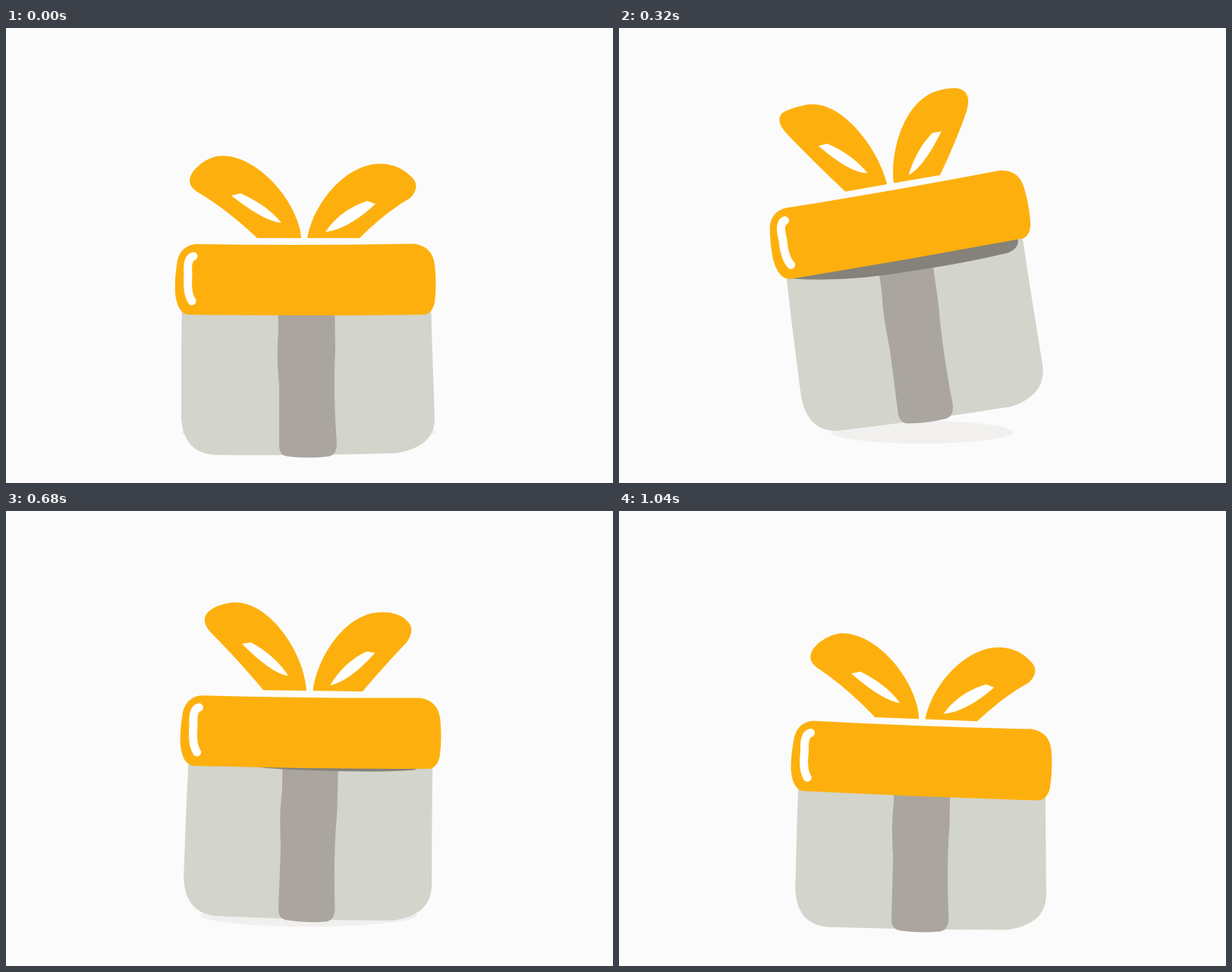
These frames come from a looping animation (800 by 600 pixels, 1.08 s). An HTML page:

```html
<!DOCTYPE html>
<html lang="en">
<head>
<meta charset="utf-8">
<title>Hopping gift box</title>
<style>
  html, body { margin: 0; width: 100%; height: 100%; overflow: hidden; background: #fbfbfb; }
  svg { display: block; width: 100vw; height: 100vh; }
  .gold { fill: #fdb00d; }
  .shine { fill: #fff; }
  .box { fill: #d3d4cb; }
  .ribbon { fill: #aaa69f; }
  .gap { fill: #84827a; }
  .shadow { fill: #f1f0ee; }
  .glint { fill: none; stroke: #fff; stroke-width: 11; stroke-linecap: round; }
</style>
</head>
<body>
<svg viewBox="0 0 800 600">
  <ellipse id="shadow" class="shadow" cx="399" cy="533" rx="168" ry="15"/>
  <g id="body">
    <path class="box" d="M232,355 L231,420 V515 Q234,560 275,563 Q390,564 515,560.5
      Q565,552 565,515 L561,400 L560,355Z"/>
    <path class="ribbon" d="M358,355 L359,400 Q356,430 360,470 V550 Q360,564 372,565
      Q398,568 425,565 Q436,563 436,548 Q431,480 434,425 L433,355Z"/>
  </g>
  <g id="top">
    <path id="gap" class="gap" d="M240,296 V313 Q310,331 400,331 Q475,333 530,329
      Q547,325 545,311 V296Z"/>
    <path class="gold" d="M250,285 Q395,287 538,284.5 Q562,288 565,312 Q568,338 565,362
      Q561,378 550,378 Q395,380 240,378 Q226,376 223,350 Q222,330 226,306 Q231,287 250,285Z"/>
    <path class="glint" d="M247,301 Q238,303 240,325 Q238,350 245,360"/>
    <!-- each bow part is drawn closed; data-open is its raised pose -->
    <path class="gold" d="M331,277 Q290,238 252,216 Q236,206 246,190 Q258,174 278,169 C325,162 385,225 389,277Z"
      data-open="M332,277 Q295,228 270,192 Q255,171 267,162 Q276,157 300,156 C345,155 384,225 388,277Z"/>
    <path class="gold" d="M397,277 C405,232 445,182 490,179 Q515,178 533,195 Q548,208 533,224 Q500,243 466,277Z"
      data-open="M397,277 C399,235 430,170 478,167 Q505,165 511,176 Q517,184 508,202 Q487,238 459,277Z"/>
    <path class="shine" d="M297,221 L309,218 Q345,234 363,257 Q340,255 297,221Z"
      data-open="M307,212 L319,211 Q349,230 365,258 Q343,255 307,212Z"/>
    <path class="shine" d="M487,232 L476,228 Q440,240 421,269 Q450,266 487,232Z"
      data-open="M471,221 L459,221 Q434,238 418,270 Q440,263 471,221Z"/>
  </g>
</svg>
<script>
const LOOP = 1080, STEP = 40, HOP = 520;
// The first hop leans left, the second right with a later swing.
const hops = [
  { start: 20, lean: -7.5, lag: 1 },
  { start: 550, lean: 5.6, lag: 1.5 }
];

const $ = id => document.getElementById(id);
const place = (id, value) => $(id).setAttribute('transform', value);
const wave = u => Math.sin(Math.PI * u);

// Blends two paths of the same structure.
function blend(from, to, m) {
  const goal = to.match(/[\d.]+/g);
  let i = 0;
  return from.replace(/[\d.]+/g, n => (+n + (goal[i++] - n) * m).toFixed(2));
}

const bow = [...document.querySelectorAll('[data-open]')].map(el =>
  ({ el, closed: el.getAttribute('d'), open: el.dataset.open }));

// Body height: eases up, then falls faster and faster.
const bodyRise = u => 49 * (u < 0.5
  ? wave(u) ** 2
  : Math.max(0, 1 - ((u - 0.5) / 0.52) ** 1.6));

function draw(time) {
  const t = Math.floor((time % LOOP) / STEP) * STEP;
  const hop = hops[t < hops[1].start ? 0 : 1];
  const u = Math.max(0, (t - hop.start) / HOP);

  const swing = wave(u) ** 2;
  const up = bodyRise(u);
  const lift = 80 * swing - up;      // lid height above the body
  const angle = hop.lean * wave(u ** hop.lag);

  const base = `translate(${398 - 1.1 * angle} ${566 - up}) rotate(${angle})`;
  place('body', `${base} scale(${1 - 0.00084 * up} ${1 + 0.0014 * up}) translate(-398 -566)`);
  place('top', `${base} translate(-398 ${-566 - lift}) rotate(${-0.09 * lift} 394.5 331.5)`);
  place('gap', `translate(0 ${35.5 + lift})`);
  $('shadow').setAttribute('rx', 168 - 1.03 * up);
  for (const { el, closed, open } of bow) {
    el.setAttribute('d', blend(closed, open, 1.1 * swing));
  }
}

const begin = performance.now();
function tick() {
  draw(performance.now() - begin);
  requestAnimationFrame(tick);
}
tick();
</script>
</body>
</html>
```
